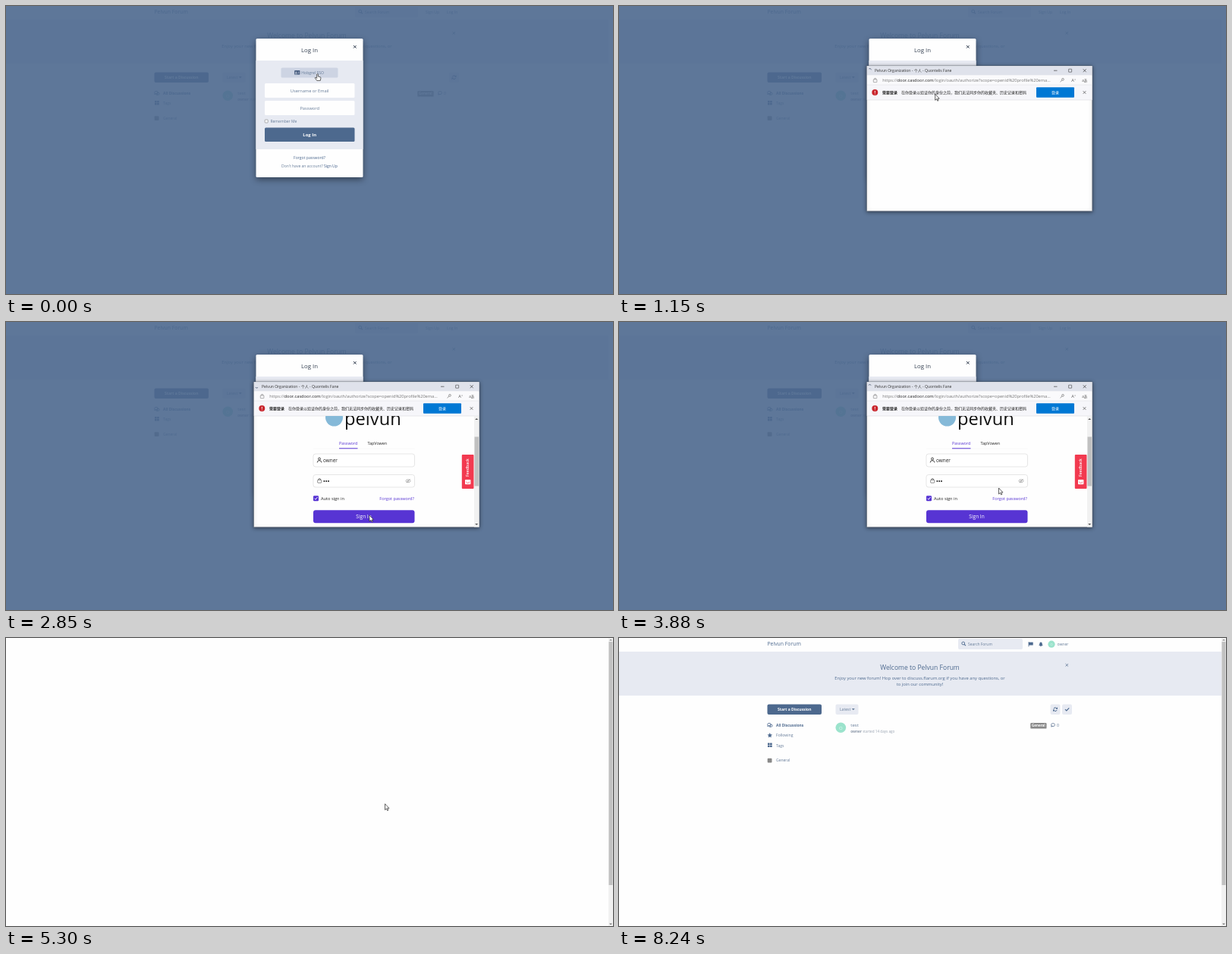
An HTML page with a canvas that plays this animation: 800 px wide and 380 px high, repeating every 8970 ms.

```html
<!DOCTYPE html>
<html lang="en">
<head>
<meta charset="utf-8">
<title>Forum single sign-on</title>
<style>
html, body { margin: 0; width: 100%; height: 100%; overflow: hidden; background: #fefefe; }
canvas { display: block; width: 800px; height: 380px; }
</style>
</head>
<body>
<canvas id="stage"></canvas>
<script>
const LOOP = 8970;
const FONT = '"Open Sans", "Noto Sans CJK SC", "Noto Sans CJK", sans-serif';
const BLUE = '#4d698e', PALE = '#e7eaf2', SOFT = '#667c99', PURPLE = '#5734d3';
const canvas = document.getElementById('stage');
const c = canvas.getContext('2d');
const dpr = window.devicePixelRatio || 1;
canvas.width = 800 * dpr;
canvas.height = 380 * dpr;

const clamp = v => Math.max(0, Math.min(1, v));
const phase = (t, from, to) => clamp((t - from) / (to - from));
const easeOut = p => 1 - (1 - p) ** 3;
const easeInOut = p => p * p * (3 - 2 * p);

// Interpolates rows of [time, value, value...]
function track(rows, t, ease = easeInOut) {
  let i = rows.length - 1;
  while (i > 0 && rows[i][0] > t) i--;
  const a = rows[i], b = rows[i + 1] || a;
  const p = a === b ? 0 : ease(phase(t, a[0], b[0]));
  return a.slice(1).map((v, k) => v + (b[k + 1] - v) * p);
}

function box(x, y, w, h, fill, r = 0, stroke) {
  c.beginPath();
  c.roundRect(x, y, w, h, r);
  if (fill) { c.fillStyle = fill; c.fill(); }
  if (stroke) { c.strokeStyle = stroke; c.lineWidth = .5; c.stroke(); }
}
function text(s, x, y, size, color, { align = 'left', weight = 400 } = {}) {
  c.font = `${weight} ${size}px ${FONT}`;
  c.textAlign = align;
  c.fillStyle = color;
  c.fillText(s, x, y);
  return x + c.measureText(s).width;
}
const center = (s, x, y, size, color, weight) => text(s, x, y, size, color, { align: 'center', weight });
function disc(x, y, r, fill) {
  c.beginPath();
  c.arc(x, y, r, 0, 7);
  c.fillStyle = fill;
  c.fill();
}
function line(points, color, width = .7) {
  c.beginPath();
  points.forEach(([x, y]) => c.lineTo(x, y));
  c.strokeStyle = color;
  c.lineWidth = width;
  c.stroke();
}
function poly(points, fill) {
  c.beginPath();
  points.forEach(([x, y]) => c.lineTo(x, y));
  c.closePath();
  c.fillStyle = fill;
  c.fill();
}
function arc(x, y, r, from, to, color, width = .7) {
  c.beginPath();
  c.arc(x, y, r, from, to);
  c.strokeStyle = color;
  c.lineWidth = width;
  c.stroke();
}
function cross(x, y, r, color, width = .7) {
  line([[x - r, y - r], [x + r, y + r]], color, width);
  line([[x - r, y + r], [x + r, y - r]], color, width);
}
const chevron = (x, y) => line([[x - 2, y - 1], [x, y + 1], [x + 2, y - 1]], '#444', .6);
const caret = (x, y, d, color) => poly([[x - 2, y - d], [x + 2, y - d], [x, y + d]], color);

function faded(alpha, draw) {
  c.save();
  c.globalAlpha *= alpha;
  draw();
  c.restore();
}

function star(x, y, r, color) {
  poly([...Array(10).keys()].map(i => {
    const a = i * Math.PI / 5 - Math.PI / 2, d = i % 2 ? r * .48 : r;
    return [x + d * Math.cos(a), y + d * Math.sin(a)];
  }), color);
}
function bubble(x, y, r, color) {
  c.beginPath();
  c.ellipse(x, y, r, r * .8, 0, 0, 7);
  c.strokeStyle = color;
  c.lineWidth = .8;
  c.stroke();
  line([[x - r * .7, y + r * .4], [x - r, y + r], [x - r * .1, y + r * .8]], color, .7);
}
function refresh(x, y) {
  arc(x, y, 2.3, 3.5, 5.9, BLUE, 1);
  arc(x, y, 2.3, .35, 2.8, BLUE, 1);
  poly([[x + 3, y - 3], [x + 3, y - .4], [x + .6, y - .4]], BLUE);
  poly([[x - 3, y + 3], [x - 3, y + .4], [x - .6, y + .4]], BLUE);
}

function header(user) {
  text('Pelvun Forum', 195.5, 10.3, 6.85, BLUE);
  const x = user ? 447 : 460;
  box(x, 1, user ? 85 : 83, 14, PALE, 2);
  arc(x + 6.7, 7, 1.9, 0, 7, BLUE, .9);
  line([[x + 8, 8.4], [x + 10, 10.2]], BLUE, 1.1);
  text('Search Forum', x + 13, 10.2, 4.95, SOFT);
  if (!user) {
    text('Sign Up', 553, 10.2, 5.1, SOFT);
    text('Log In', 581, 10.2, 5.1, SOFT);
    return;
  }
  line([[540, 5.2], [540, 11.4]], BLUE, .8);
  poly([[540, 5.6], [545.7, 5.6], [545.7, 9.5], [540, 9.5]], BLUE);
  poly([[553.3, 10], [554.2, 8.6], [554.4, 6.4], [556, 5.2], [557.6, 6.4], [557.8, 8.6], [558.7, 10]], BLUE);
  disc(556, 10.5, .8, BLUE);
  disc(570, 8.2, 4.6, '#9be3cc');
  center('O', 570, 9.7, 4, '#e8faf4');
  text('owner', 577.5, 10.2, 5.05, SOFT);
}

function sidebar(user) {
  box(195.5, 87.5, 71.5, 13.5, BLUE, 2);
  center('Start a Discussion', 231.2, 96, 5, '#fff', 700);
  bubble(198, 114.2, 2.3, BLUE);
  bubble(200.4, 115.7, 1.8, BLUE);
  text('All Discussions', 207, 117, 4.95, BLUE, { weight: 700 });
  if (user) {
    star(198.8, 128.5, 3.4, BLUE);
    text('Following', 207, 130.4, 5.1, SOFT);
  }
  const tags = user ? 141.5 : 128;
  for (let i = 0; i < 4; i++) {
    box(196 + i % 2 * 3.1, tags - 3 + (i >> 1) * 3, 2.6, 2.5, BLUE, .3);
  }
  text('Tags', 207, tags + 2.4, 5.1, SOFT);
  const general = user ? 161.5 : 148;
  box(195.7, general - 2.8, 5.8, 5.8, '#888', 1);
  text('General', 207, general + 1.9, 5, SOFT);
}

function forum(user) {
  box(0, 0, 800, 380, '#fefefe');
  header(user);
  box(0, 18, 794, 58, PALE);
  center('Welcome to Pelvun Forum', 396.5, 42, 8.55, BLUE);
  center('Enjoy your new forum! Hop over to discuss.flarum.org if you have any questions, or', 396.5, 54.5, 5.8, BLUE);
  center('to join our community!', 396.5, 63, 5.8, BLUE);
  cross(590.3, 35.7, 1.7, SOFT, .9);
  sidebar(user);
  box(285.5, 87.5, 30, 13.5, PALE, 2);
  text('Latest', 291, 96.2, 5.05, SOFT);
  caret(308.8, 94.2, 1.1, SOFT);
  if (user) {
    box(568.5, 87.5, 13, 13.5, PALE, 2);
    refresh(575, 94.2);
    box(584, 87.5, 13, 13.5, PALE, 2);
    line([[588, 94.2], [589.8, 96], [593.2, 92.4]], BLUE, 1.2);
  } else {
    box(584, 87.5, 13, 13.5, PALE, 2);
    refresh(590.5, 94.2);
  }
  disc(292.3, 118.3, 6.8, '#9be3cc');
  center('O', 292.3, 120.6, 6, '#e8faf4');
  text('test', 305.3, 117, 6.1, SOFT);
  const end = text('owner', 305.3, 125, 4.65, '#8b97a8', { weight: 700 });
  text(' started 14 days ago', end, 125, 4.65, '#9aa4b2');
  box(542.3, 112, 21.2, 7.6, '#888', 1.2);
  center('General', 552.9, 117.4, 4.5, '#fff', 700);
  bubble(572, 114.6, 2.5, SOFT);
  text('0', 577, 117.1, 5.3, SOFT);
}

function pageScrollbar() {
  box(794, 0, 6, 380, '#f1f1f1');
  box(794.5, 5, 5, 321, '#c1c1c1');
  caret(797, 2.5, -.8, '#777');
  caret(797, 377.5, .8, '#555');
}

function modal(hover) {
  faded(.9, () => box(0, 0, 800, 380, BLUE));
  c.save();
  c.shadowColor = 'rgba(0,0,0,.45)';
  c.shadowBlur = 8 * dpr;
  c.shadowOffsetY = 3 * dpr;
  box(329.5, 43, 141, 183, '#fefefe', 1.5);
  c.restore();
  box(329.5, 72, 141, 117, PALE);
  center('Log In', 400, 60.5, 7.8, '#333f50');
  cross(459.8, 53.8, 1.8, '#333f50', 1);
  box(362.5, 81.5, 75, 13, hover ? '#cdd4e3' : '#d7dde9', 1.5);
  box(380.2, 85, 7.2, 5.6, '#3f567a', .7);
  disc(382.3, 87.3, .9, '#d7dde9');
  box(381, 88.6, 2.6, 1, '#d7dde9');
  line([[384.4, 87], [386.6, 87]], '#d7dde9', .6);
  line([[384.4, 88.6], [386.6, 88.6]], '#d7dde9', .6);
  text('Hobgrel SSO', 389.3, 89.8, 5.1, SOFT);
  box(341, 102, 118.5, 19, '#fefefe', 1.5);
  center('Username or Email', 400.2, 113.7, 5.7, SOFT);
  box(341, 125, 118.5, 19, '#fefefe', 1.5);
  center('Password', 400.2, 136.8, 5.7, SOFT);
  box(341.2, 150, 4, 4, '#fff', .7, '#666');
  text('Remember Me', 348.4, 154.2, 5.07, SOFT);
  box(341, 160.5, 118.5, 18.5, BLUE, 1.5);
  center('Log In', 400.2, 172, 5.9, '#fff', 700);
  center('Forgot password?', 400, 201.8, 5.1, BLUE);
  const end = text("Don't have an account? ", 363, 212.6, 5.05, SOFT);
  text('Sign Up', end, 212.6, 5.05, '#3c5a86');
}

function signInPage(scroll) {
  c.save();
  c.beginPath();
  c.rect(327, 124, 296, 146.5);
  c.clip();
  c.translate(0, 20 - scroll);
  disc(432.5, 149, 11.5, '#85b9d8');
  text('pelvun', 446, 159, 23.7, '#111');
  text('Password', 439, 185, 5.4, PURPLE);
  text('TapVowen', 476.5, 185, 5.4, '#222');
  line([[405, 190.2], [538.5, 190.2]], '#eee', .5);
  line([[439, 189.8], [463.5, 189.8]], PURPLE, 1);
  box(405, 197, 133.5, 17, '#fff', 3, '#ccc');
  arc(413, 203.6, 1.5, 0, 7, '#222', .8);
  arc(413, 208.5, 2.8, Math.PI, 0, '#222', .8);
  text('owner', 418, 207.8, 6.4, '#222');
  box(405, 224.5, 133.5, 16.5, '#fff', 3, '#ccc');
  box(410.7, 231.4, 5, 3.8, null, .5, '#222');
  arc(413.2, 231.2, 1.5, Math.PI, 0, '#222');
  for (let i = 0; i < 3; i++) disc(419.4 + i * 2.8, 232.9, 1, '#222');
  c.beginPath();
  c.ellipse(530, 232.7, 3, 1.9, 0, 0, 7);
  c.strokeStyle = '#888';
  c.lineWidth = .6;
  c.stroke();
  disc(530, 232.7, .8, '#888');
  line([[527.6, 235.2], [532.6, 230.2]], '#888', .6);
  box(405, 252.2, 7, 7, PURPLE, 1.2);
  line([[406.6, 255.7], [408, 257.2], [410.6, 254]], '#fff', .9);
  text('Auto sign in', 415, 257.8, 5.65, '#222');
  text('Forgot password?', 492.3, 257.8, 5.55, PURPLE);
  box(405, 271.3, 133.5, 17, PURPLE, 3);
  center('Sign In', 471.5, 282, 6.5, '#fff');
  text('No account?', 473, 297.5, 5.5, '#222');
  text('sign up now', 507, 297.5, 5.5, PURPLE);
  c.restore();

  box(617, 124, 6.5, 146.5, '#f1f1f1');
  box(617.5, 133 + scroll * .43, 5.5, 65, '#c1c1c1');
  caret(620.2, 128, -1, '#555');
  caret(620.2, 267, 1, '#555');
  box(600.8, 175, 15.7, 45, '#f23a50', 1);
  c.save();
  c.translate(610.3, 204);
  c.rotate(-Math.PI / 2);
  text('Feedback', 0, 0, 5.2, '#fff', { weight: 600 });
  c.restore();
  box(605, 208, 7.4, 6.2, '#fff', .8);
  line([[606.3, 211], [608.7, 212.6], [611.1, 211]], '#f23a50', .7);
}

function translatePopup() {
  c.save();
  c.shadowColor = 'rgba(0,0,0,.35)';
  c.shadowBlur = 5 * dpr;
  box(504.5, 104, 116.5, 67, '#fdfdfd', 1.5);
  c.restore();
  text('翻译 英语 页面?', 511, 114.8, 5.9, '#222', { weight: 700 });
  cross(614.5, 109.2, 2.2, '#555', .6);
  text('翻译为', 511, 128, 5, '#222', { weight: 700 });
  box(511.3, 131.5, 103.5, 13.5, '#fff', 1, '#bbb');
  text('中文（简体）', 515.5, 140.2, 5, '#222');
  chevron(608.5, 138.3);
  box(511.3, 150.5, 50.2, 13.5, '#0078d4', 1);
  center('翻译', 536.4, 159.2, 5, '#fff');
  box(564.5, 150.5, 50.3, 13.5, '#ececee', 1);
  center('更多', 588, 159.2, 5, '#222');
  chevron(608.8, 157.3);
}

function addressBar(loaded, popup) {
  if (!loaded) {
    arc(338, 98, 3, 0, 7, '#666', .6);
    line([[338, 97.4], [338, 99.8]], '#666', .7);
    disc(338, 96.2, .4, '#666');
  } else {
    box(335.3, 97, 4.6, 3.6, null, .4, '#666');
    arc(337.6, 96.8, 1.4, Math.PI, 0, '#666', .6);
  }
  const host = loaded ? 'door.casdoor.com' : 'flarum.pelvun.com';
  const path = !loaded ? '/auth/passport'
    : '/login/oauth/authorize?scope=openid%20profile%20' + (popup ? 'email&st...' : 'ema...');
  let x = text('https://', 347.3, 100, 5.65, '#777');
  x = text(host, x, 100, 5.65, '#222');
  text(path, x, 100, 5.65, '#777');
  if (!loaded) return;
  if (popup) disc(613.7, 97.7, 6, '#c8c9ce');
  else {
    arc(585, 96.8, 1.4, 0, 7, '#666', .6);
    line([[584, 97.8], [581.5, 100.2]], '#666', .7);
  }
  text('A', 596.3, 100, 5.5, '#555');
  text('»', 600.3, 97.6, 3.5, '#555');
  center('aあ', 613.7, 99.7, 4.6, '#555');
}

function browser(t) {
  const opening = easeOut(phase(t, 235, 450)), closing = phase(t, 4080, 4270);
  const shown = opening * (1 - closing);
  if (!shown) return;
  const loaded = t >= 970, scale = .94 + .06 * shown;
  const popup = phase(t, 1600, 1720) * (1 - phase(t, 2790, 2850));
  c.save();
  c.globalAlpha = shown;
  c.translate(475, 175);
  c.scale(scale, scale);
  c.translate(-475, -175);
  c.save();
  c.shadowColor = 'rgba(0,0,0,.5)';
  c.shadowBlur = 5 * dpr;
  c.shadowOffsetY = dpr;
  box(326.5, 79, 297.3, 191.8, '#fefefe', .5, '#4b5563');
  c.restore();
  box(326.8, 79.3, 296.7, 12.2, '#dfe2eb');
  box(326.8, 91.5, 296.7, 12.5, '#fafafc');
  box(326.8, 104, 296.7, 20, '#f6f6fa');
  line([[327, 104], [623.5, 104]], '#dcdde3', .5);
  line([[327, 124], [623.5, 124]], '#d4d5db', .5);

  const busy = (t < 1250) || t >= 2820;
  if (busy) {
    const a = t / 110;
    arc(330.5, 84.8, 2.2, a, a + 1.8, '#4a5870', .8);
  } else disc(332, 85, 2.8, PURPLE);
  text((loaded ? 'Pelvun Organization' : '无标题') + ' - 个人 - Quontelis Fane', 337, 86.9, 5.05, '#333');
  line([[573, 85.2], [577.5, 85.2]], '#222', .6);
  box(592.6, 83.2, 4, 4, null, .3, '#222');
  cross(613.7, 85.2, 2, '#222', .6);
  addressBar(loaded, popup > 0);

  disc(337.3, 114, 4, '#c9252d');
  line([[337.3, 111.8], [337.3, 114.6]], '#fff', .9);
  disc(337.3, 116, .5, '#fff');
  text('需要登录', 347, 115.9, 5, '#222', { weight: 700 });
  text('在你登录以验证你的身份之前，我们无法同步你的收藏夹、历史记录和密码', 372, 115.9, 5, '#222');
  box(550, 107.3, 50, 13.4, '#0078d4', 1);
  center('登录', 575, 115.9, 5, '#fff');
  cross(613.5, 114, 1.9, '#333', .6);

  if (t >= 1250) {
    const [scroll] = track([[1880, 0], [2090, 20], [2200, 24], [2420, 43]], t);
    signInPage(scroll);
  }
  if (popup) faded(popup, translatePopup);
  c.restore();
}

const POINTER = [
  [60, 410.5, 89], [240, 407.5, 89.5], [900, 407.5, 89.5], [1820, 458, 236],
  [2200, 458, 236], [2700, 479, 255], [2900, 479, 255], [3550, 500.5, 219],
  [4270, 500.5, 219], [4850, 500.5, 219], [4940, 499.5, 218.8],
  [6450, 499.5, 218.8], [7150, 586, 4], [7420, 586, 4], [8240, 747, 382]
];

function pointer(t) {
  const [x, y] = track(POINTER, t);
  c.save();
  c.translate(x, y);
  c.lineJoin = 'round';
  c.fillStyle = '#fff';
  c.strokeStyle = '#222';
  c.lineWidth = .7;
  const hand = t < 240;
  const shape = hand
    ? 'M-.8 1Q0 -.4 .8 1V4L3.6 4.7Q4.6 5 4.4 6.2L3.8 9.4H-.8L-3 6.4Q-3.6 5.2 -2.4 5.3L-.8 6.4Z'
    : 'M0 0V8L1.9 6.4L3.1 9L4.3 8.4L3.1 5.9H5.5Z';
  const path = new Path2D(shape);
  c.fill(path);
  c.stroke(path);
  c.restore();
}

function draw(t) {
  c.setTransform(dpr, 0, 0, dpr, 0, 0);
  if (t < 5300) {
    forum(false);
    modal(t < 240);
    browser(t);
  } else {
    if (t < 5400) box(0, 0, 800, 380, '#fefefe');
    else forum(true);
    pageScrollbar();
  }
  pointer(t);
}

const start = performance.now();
function tick() {
  draw((performance.now() - start) % LOOP);
  requestAnimationFrame(tick);
}
tick();
</script>
</body>
</html>
```
